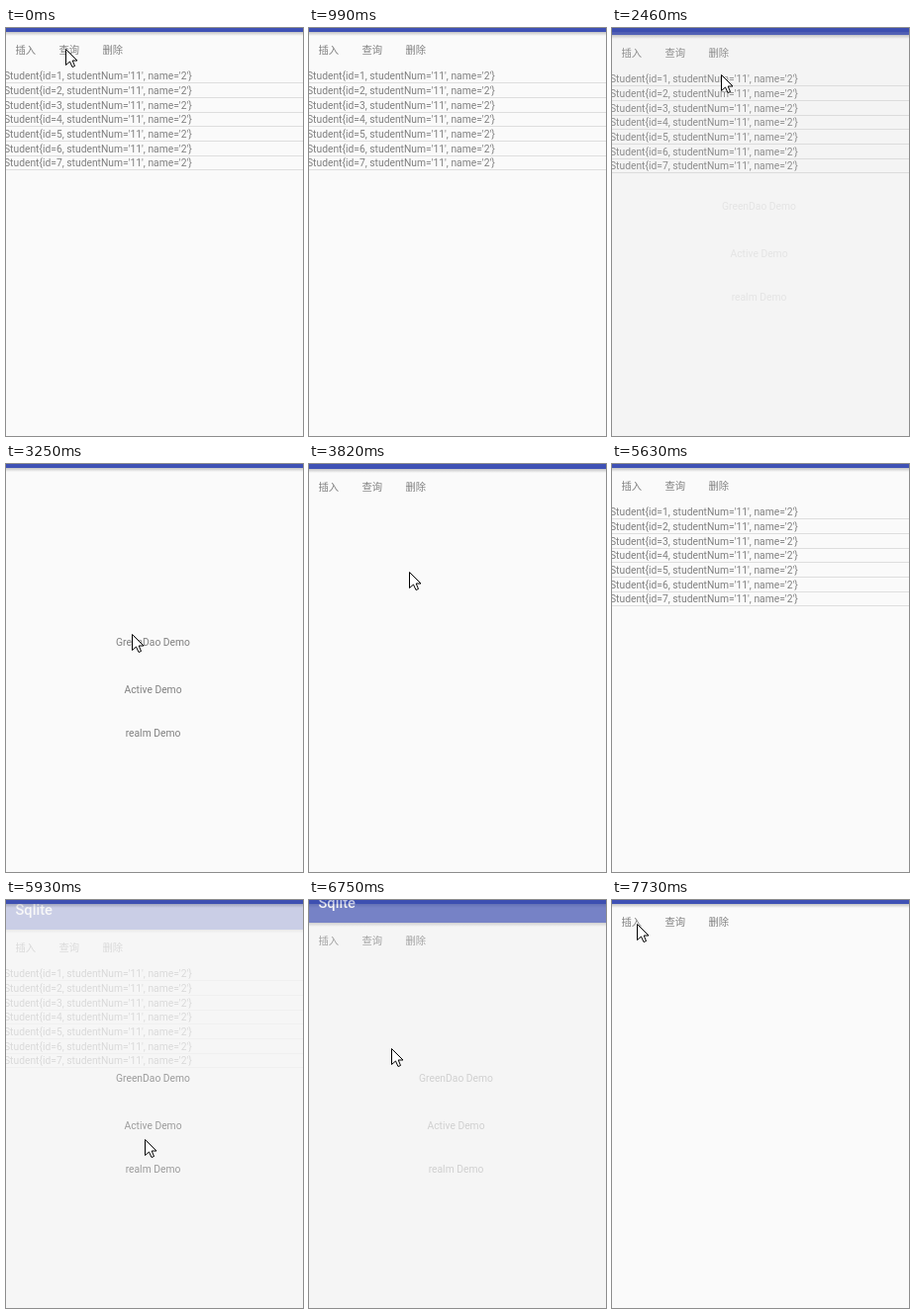
These frames come from a looping animation (300 by 413 pixels, 8000 ms). An HTML page with a canvas:

```html
<!DOCTYPE html>
<html lang="zh-CN">
<head>
<meta charset="utf-8">
<title>Database demo</title>
<style>
html, body { margin: 0; width: 100%; height: 100%; overflow: hidden; background: #fafafa; }
canvas { display: block; width: 300px; height: 413px; }
</style>
</head>
<body>
<canvas id="stage" width="300" height="413"></canvas>
<script>
const W = 300, H = 413, LOOP = 8000;
const ctx = document.getElementById('stage').getContext('2d');
const layer = document.createElement('canvas');
layer.width = W;
layer.height = H;
const lctx = layer.getContext('2d');

const FONT = 'Roboto, "Noto Sans CJK SC", "Noto Sans CJK", sans-serif';
const GREY = 'rgba(0,0,0,0.49)';
const SLIDE = 47;   // how far a page drops while it leaves
const TICK = 140;   // usual time between screen refreshes

// Pointer stops: time, x, y (y beyond H is off the screen)
const stops = [
  [0, 60, 21], [150, 62, 21], [430, 62, 21], [990, 205, 520],
  [1960, 190, 440], [2460, 110, 47], [3250, 127, 172], [4280, 67, 25],
  [4700, 170, 556], [5500, 170, 556], [5640, 150, 275], [5930, 140, 242],
  [6750, 83, 150], [7730, 25, 24]
];

// When the list page closes or opens over the menu
const moves = [
  { at: 2337, kind: 'close' }, { at: 3490, kind: 'open' },
  { at: 5715, kind: 'close' }, { at: 6692, kind: 'open' }
];

const clamp = v => Math.min(1, Math.max(0, v));
const smooth = p => p * p * (3 - 2 * p);

// Pointer position at the latest refresh, and the time of that refresh
function refresh(t) {
  const i = stops.findIndex(s => s[0] > t);
  if (i < 0) return stops[stops.length - 1];
  const a = stops[i - 1], b = stops[i], span = b[0] - a[0];
  const n = Math.max(1, Math.round(span / TICK));
  const k = Math.floor((t - a[0]) / span * n) / n;
  return a.map((v, j) => Math.round(v + (b[j] - v) * k));
}

// Opacity and drop of the upper page, and brightness of the lower one
function pagesAt(t) {
  const move = moves.filter(m => m.at <= t).pop();
  if (!move) return { alpha: 1, drop: 0, light: 1 };
  const e = t - move.at;
  if (move.kind === 'close') {
    const p = clamp(e / 250);
    return {
      alpha: 1 - clamp((e - 100) / 150),
      drop: SLIDE * p ** 4,
      light: 0.7 + 0.3 * smooth(p)
    };
  }
  return {
    alpha: 1 - (1 - clamp(e / 200)) ** 3.3,
    drop: SLIDE * (1 - clamp(e / 350)) ** 5,
    light: 1 - 0.3 * clamp(e / 290)
  };
}

function text(c, str, x, y, color = GREY, font = '10.3px ') {
  c.font = font + FONT;
  c.fillStyle = color;
  c.fillText(str, x, y);
}

function page(c) {
  c.fillStyle = '#fafafa';
  c.fillRect(0, -60, W, H + 60);
  const shade = c.createLinearGradient(0, 4, 0, 8);
  shade.addColorStop(0, 'rgba(0,0,0,0.22)');
  shade.addColorStop(1, 'rgba(0,0,0,0)');
  c.fillStyle = shade;
  c.fillRect(0, 4, W, 4);
  c.fillStyle = '#3f51b5';
  c.fillRect(0, -60, W, 64);
}

function menuPage(c) {
  page(c);
  c.textAlign = 'center';
  text(c, 'GreenDao Demo', 148.5, 184);
  text(c, 'Active Demo', 148.5, 232);
  text(c, 'realm Demo', 148.5, 276);
  c.textAlign = 'left';
}

function listPage(c, filled) {
  page(c);
  text(c, 'Sqlite', 9.5, -11, '#fff', '500 14.7px ');
  ['插入', '查询', '删除'].forEach((s, i) => text(c, s, 9.5 + 44 * i, 26));
  if (!filled) return;
  for (let i = 0; i < 7; i++) {
    const y = Math.round(14.7 * i + 0.2);
    text(c, `Student{id=${i + 1}, studentNum='11', name='2'}`, -2, 52 + y);
    c.fillStyle = '#dedede';
    c.fillRect(0, 55 + y, W, 1);
  }
}

function pointer(x, y) {
  const arrow = new Path2D('M0 0V16L4 12.5L6.5 18L9 17L6.7 11.5H11.5Z');
  ctx.save();
  ctx.translate(x + 0.5, y + 0.5);
  ctx.fillStyle = '#fff';
  ctx.fill(arrow);
  ctx.strokeStyle = '#000';
  ctx.stroke(arrow);
  ctx.restore();
}

function draw(now) {
  const [t, x, y] = refresh(now);
  const { alpha, drop, light } = pagesAt(t);
  const filled = t < 3490 || (t >= 4400 && t < 6600);

  menuPage(ctx);
  ctx.fillStyle = `rgba(0,0,0,${1 - light})`;
  ctx.fillRect(0, 0, W, H);

  lctx.save();
  lctx.clearRect(0, 0, W, H);
  lctx.translate(0, Math.round(drop));
  listPage(lctx, filled);
  lctx.restore();

  ctx.globalAlpha = alpha;
  ctx.drawImage(layer, 0, 0);
  ctx.globalAlpha = 1;
  pointer(x, y);
}

const start = performance.now();
function loop() {
  draw((performance.now() - start) % LOOP);
  requestAnimationFrame(loop);
}
loop();
</script>
</body>
</html>
```
